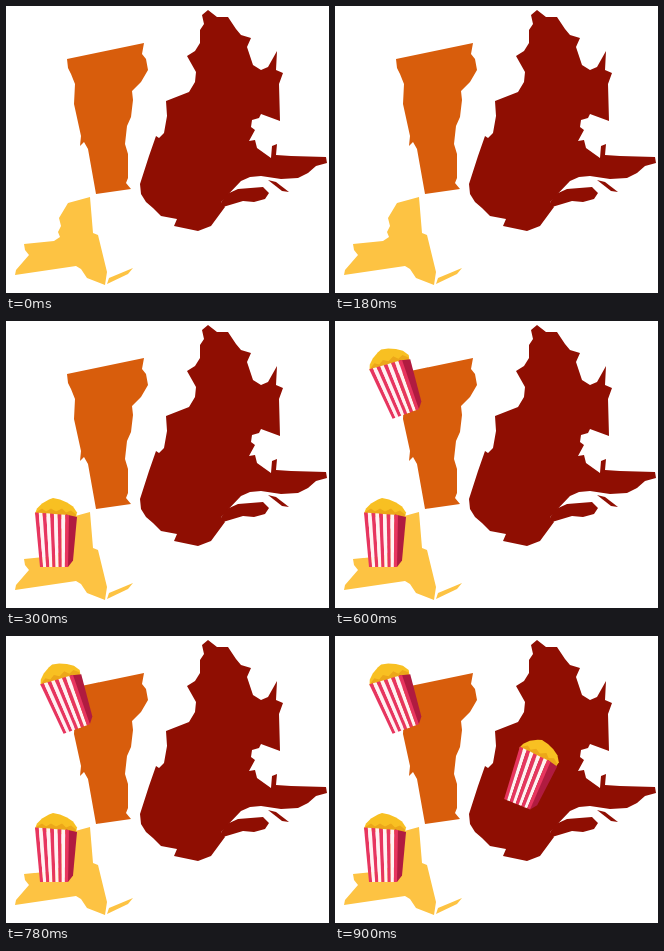
These frames come from a looping animation (323 by 287 pixels, 1200 ms). An HTML page:

```html
<!DOCTYPE html>
<html lang="en">
<head>
<meta charset="utf-8">
<title>Popcorn map</title>
<style>
html, body { margin: 0; width: 100%; height: 100%; overflow: hidden; background: #fff; }
svg { display: block; width: 323px; height: 287px; }
</style>
</head>
<body>
<svg viewBox="0 0 323 287">
  <defs>
    <g id="box">
      <path fill="#f8c022" d="M-21-19L-19-24-14-29-7-33-3-34.5 4-33 11-30 17-26 21-20 20-15 8-13-20-17Z"/>
      <path fill="#eca719" d="M-19-21L-14-24-10-21-5-24 0-21 6-24 10-20 15-22 20-18 19-15-20-18Z"/>
      <path fill="#b01b40" d="M10-18L21-15.5 17 28 12 34.5Z"/>
      <g id="stripes"></g>
    </g>
  </defs>
  <path fill="#d85d0c" d="M61 53L138 37 136 48 140 53 142 64 135 76 126 85 127 94 125 111 121 120 119 138 122 148 122 172 120 177 125 183 90 188 82 143 78 136 74 140 75 130 68 98 69 78 65 68 62 62Z"/>
  <g fill="#fdc343">
    <path d="M9 269L10 264 23 249 19 244 18 238 48 235 54 231 52 226 55 220 53 212 62 197 84 191 87 227 92 229 101 266 99 279 81 272 75 263 70 260Z"/>
    <path d="M101 278L103 272 127 262 122 268Z"/>
  </g>
  <g fill="#8f0e02">
    <path d="M202 4L211 11 222 11 230 23 235 29 245 32 241 41 247 59 255 64 262 61 271 45 270 64 277 67 273 78 274 115 255 108 253 112 246 114 245 121 249 124 243 135 249 134 251 142 265 152 266 140 271 138 270 149 285 150 320 151 321 157 310 160 302 167 292 172 275 173 255 170 244 171 235 175 215 196 219 201 205 220 192 225 168 220 171 213 155 210 147 202 140 196 135 188 134 178 143 150 150 130 153 132 158 127 161 110 160 95 183 86 189 76 190 66 181 50 189 45 194 37 194 24 198 18 196 9Z"/>
    <path d="M215 196L221 188 232 183 257 181 263 187 259 193 248 196 237 195 217 201Z"/>
    <path d="M262 174L270 176 283 186 276 185Z"/>
  </g>
  <g id="boxes"></g>
</svg>
<script>
const STEP = 300;
const STRIPES = 9;
const NS = 'http://www.w3.org/2000/svg';
// step of appearance, centre x, centre y, tilt
const places = [
  [1, 50, 211.5, 0],
  [2, 60.8, 59.9, -20],
  [3, 196.9, 137, 22]
];

const byId = id => document.getElementById(id);

function add(parent, tag, attrs) {
  const node = document.createElementNS(NS, tag);
  for (const key in attrs) node.setAttribute(key, attrs[key]);
  return parent.appendChild(node);
}

const upper = u => `${-21 + 34 * u} ${-20 + 2.5 * u}`;
const lower = u => `${-16 + 28 * u} 34.5`;
for (let i = 0; i < STRIPES; i++) {
  const a = i / STRIPES, b = (i + 1) / STRIPES;
  add(byId('stripes'), 'path', {
    d: `M${upper(a)}L${upper(b)} ${lower(b)} ${lower(a)}Z`,
    fill: i % 2 ? '#fff1f2' : '#e7355f'
  });
}

const boxes = places.map(([, x, y, tilt]) => add(byId('boxes'), 'use', {
  href: '#box', transform: `translate(${x} ${y}) rotate(${tilt})`
}));

const start = performance.now();
function draw(now) {
  const step = Math.floor(Math.max(0, now - start) / STEP) % 4;
  boxes.forEach((box, i) => {
    box.style.visibility = step >= places[i][0] ? 'visible' : 'hidden';
  });
  requestAnimationFrame(draw);
}
draw(start);
</script>
</body>
</html>
```
